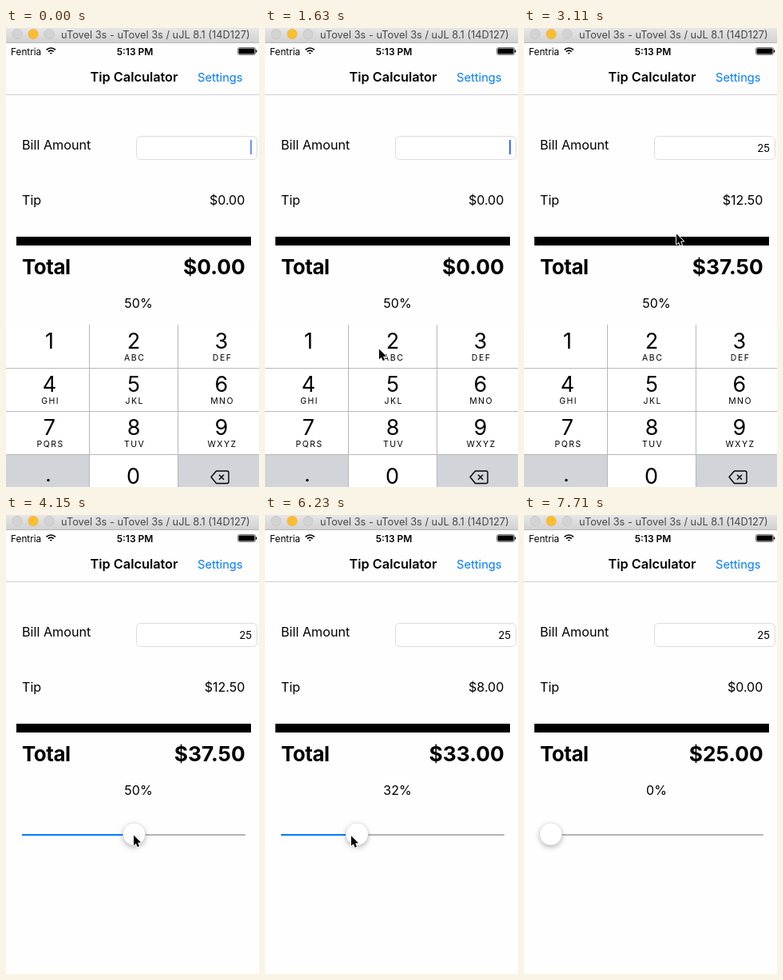
Recreate the animation shown at these times as an HTML page with a canvas. Size 317 px wide and 574 px high, loop 8 s.

```html
<!DOCTYPE html>
<html lang="en">
<head>
<meta charset="utf-8">
<title>Tip Calculator</title>
<style>
  html, body { margin: 0; width: 100%; height: 100%; overflow: hidden; background: #fefefe; }
  canvas { display: block; width: 317px; height: 574px; }
</style>
</head>
<body>
<canvas id="stage"></canvas>
<script>
const W = 317, H = 574, LOOP = 8000, STEP = 148.3;
const BLUE = '#007aff', KEY_GREY = '#d1d5da', LINE = '#b5b7ba';
const canvas = document.getElementById('stage');
const ctx = canvas.getContext('2d');
const dpr = window.devicePixelRatio || 1;
canvas.width = W * dpr;
canvas.height = H * dpr;

const clamp = v => Math.max(0, Math.min(1, v));
const linear = u => u;
const smooth = u => u * u * (3 - 2 * u);
const easeOut = u => u * (2 - u);
const money = v => '$' + v.toFixed(2);

// Each pointer move runs between two steps towards a position.
const ENTRY = { x: 196, y: 255 };
const MOVES = [
  { from: 3, to: 8, x: 62, y: 401, ease: easeOut },
  { from: 8, to: 11, x: 142, y: 401, ease: smooth },
  { from: 13, to: 15, x: 142, y: 441, ease: easeOut },
  { from: 18, to: 21, x: 190, y: 257, ease: smooth },
  { from: 23, to: 28, x: 159, y: 400, ease: smooth },
  { from: 35.4, to: 46, x: 75.5, y: 401, ease: linear },
  { from: 46, to: 51, x: -1, y: 411, ease: linear }
];

function pointerAt(k) {
  let { x, y } = ENTRY;
  for (const m of MOVES) {
    const u = m.ease(clamp((k - m.from) / (m.to - m.from)));
    x += (m.x - x) * u;
    y += (m.y - y) * u;
  }
  return { x, y };
}

// The thumb trails the dragging pointer slightly.
function sliderAt(k) {
  if (k < 35) return 0.5;
  return clamp(0.5 - 0.87 * (159 - pointerAt(k).x) / 254);
}

function caretAt(k) {
  if (k >= 12) return clamp((20 - k) / 2);
  return clamp(0.5 + 1.5 * Math.cos(2 * Math.PI * (k - 5.2) / 6.7));
}

function text(str, x, y, size, { weight = 400, color = '#000', align = 'left', spacing = 0 } = {}) {
  ctx.font = `${weight} ${size}px Inter, Roboto, sans-serif`;
  ctx.fillStyle = color;
  ctx.textAlign = align;
  ctx.letterSpacing = spacing + 'px';
  ctx.fillText(str, x, y);
}

function rect(x, y, w, h, color) {
  ctx.fillStyle = color;
  ctx.fillRect(x, y, w, h);
}

function paint(fill, stroke, width = 1) {
  if (fill) {
    ctx.fillStyle = fill;
    ctx.fill();
  }
  if (stroke) {
    ctx.strokeStyle = stroke;
    ctx.lineWidth = width;
    ctx.stroke();
  }
}

function circle(x, y, r, fill, stroke) {
  ctx.beginPath();
  ctx.arc(x, y, r, 0, Math.PI * 2);
  paint(fill, stroke, 0.8);
}

function roundRect(x, y, w, h, r, fill, stroke) {
  ctx.beginPath();
  ctx.roundRect(x, y, w, h, r);
  paint(fill, stroke);
}

function drawWindowBar() {
  const g = ctx.createLinearGradient(0, 0, 0, 18);
  g.addColorStop(0, '#e6e6e6');
  g.addColorStop(1, '#d2d2d2');
  rect(0, 0, W, 18, g);
  rect(0, 18, W, 1, '#b9b9b9');
  ['#d3d3d3', '#fdbd30', '#d3d3d3'].forEach((color, i) =>
    circle(14 + 20 * i, 7.5, 6, color, i === 1 ? '#efb02c' : '#c2c2c2'));
  text('uTovel 3s - uTovel 3s / uJL 8.1 (14D127)', 69, 12.5, 12.8, { color: '#484848' });
}

function drawStatusBar() {
  text('Fentria', 6, 33.5, 11.8);
  for (const r of [1.4, 4.8, 8]) {
    ctx.beginPath();
    ctx.arc(56.3, 33, r, -Math.PI * 0.75, -Math.PI * 0.25);
    paint(null, '#000', 1.7);
  }
  text('5:13 PM', 161.5, 33.5, 12, { weight: 600, align: 'center' });
  roundRect(290.5, 24.5, 22, 9, 2, null, '#777');
  roundRect(291.5, 25.5, 20, 7, 1, '#000');
  rect(313, 27.5, 1.3, 3, '#000');
}

function drawForm(bill, percent, caret) {
  const tip = bill * percent / 100;
  text('Tip Calculator', 160.5, 67, 16.3, { weight: 600, align: 'center' });
  text('Settings', 240, 66.5, 14.7, { color: BLUE });
  rect(0, 83, W, 1, '#cfcfcf');

  text('Bill Amount', 20, 151.5, 16.2);
  roundRect(163.5, 135.5, 151, 29, 5, '#fff', '#dcdcdc');
  if (bill) text(bill, 308, 155, 13.2, { align: 'right' });
  ctx.globalAlpha = caret;
  rect(306, 140, 2, 18, '#426bf2');
  ctx.globalAlpha = 1;

  text('Tip', 20, 220.5, 16.2);
  text(money(tip), 299.3, 220.5, 16, { align: 'right' });
  rect(13, 261, 294, 11, '#000');
  text('Total', 20, 307.5, 26, { weight: 700, spacing: -0.5 });
  text(money(bill + tip), 299.7, 307.5, 26.3, { weight: 700, align: 'right' });
  text(percent + '%', 166, 350, 16, { align: 'center' });
}

function drawSlider(value) {
  const x = 33.5 + value * 254;
  rect(20, 399, 280, 2, '#b4b4b4');
  rect(20, 399, x - 20, 2, BLUE);
  ctx.save();
  ctx.shadowColor = 'rgba(0,0,0,0.28)';
  ctx.shadowBlur = 6 * dpr;
  ctx.shadowOffsetY = 2.5 * dpr;
  circle(x, 399, 14, '#fff');
  ctx.restore();
  circle(x, 399, 14, '#fff', 'rgba(0,0,0,0.12)');
}

function drawDelete() {
  ctx.lineJoin = 'round';
  const icon = new Path2D('M257 561.5 L263.5 554 H277 Q279 554 279 556 V567.5 Q279 569.5 277 569.5 H263.5 Z' +
    'M267 558.7 l6 6 m0 -6 l-6 6');
  ctx.strokeStyle = '#000';
  ctx.lineWidth = 1.4;
  ctx.stroke(icon);
}

function drawKeypad(offset, pressed) {
  const letters = ['', 'ABC', 'DEF', 'GHI', 'JKL', 'MNO', 'PQRS', 'TUV', 'WXYZ'];
  ctx.save();
  ctx.translate(0, offset);
  rect(0, 371, W, 217, '#fff');
  rect(0, 534, 104, 54, KEY_GREY);
  rect(216, 534, 101, 54, KEY_GREY);
  letters.forEach((label, i) => {
    const col = i % 3, x = 54.5 + 107.7 * col - (col === 1 ? 2.2 : 0);
    const y = 371 + 54 * Math.floor(i / 3);
    if (i + 1 === pressed) rect(col * 105, y, 110, 54, '#cfd2da');
    text(i + 1, x, y + 30, 27, { align: 'center' });
    text(label, x + 1.2, y + 45.3, 10.5, { align: 'center', spacing: 1.5 });
  });
  text('0', 159.5, 570, 27, { align: 'center' });
  circle(53, 565.5, 1.7, '#000');
  drawDelete();
  for (const x of [104, 215]) rect(x, 371, 1, 217, LINE);
  for (let y = 425; y < 540; y += 54) rect(0, y, W, 1, LINE);
  ctx.restore();
}

function drawPointer({ x, y }) {
  const arrow = new Path2D('M0 0 V13.6 L3.1 10.8 L5.1 15.6 L7.5 14.6 L5.5 9.9 L9.7 9.7 Z');
  ctx.save();
  ctx.translate(x + 1, y + 0.6);
  ctx.scale(0.93, 0.93);
  ctx.lineJoin = 'round';
  ctx.lineWidth = 2;
  ctx.strokeStyle = '#fff';
  ctx.stroke(arrow);
  ctx.fillStyle = '#000';
  ctx.fill(arrow);
  ctx.restore();
}

function draw(time) {
  const k = Math.floor((time % LOOP + 20) / STEP);
  const bill = k < 13 ? 0 : k < 16 ? 2 : 25;
  const pressed = k === 12 ? 2 : k === 15 ? 5 : 0;
  const value = sliderAt(k);
  const slide = easeOut(clamp((k - 22.3) / 3.7));

  ctx.setTransform(dpr, 0, 0, dpr, 0, 0);
  rect(0, 0, W, H, '#fefefe');
  drawWindowBar();
  drawStatusBar();
  drawForm(bill, Math.round(value * 100), caretAt(k));
  drawSlider(value);
  if (slide < 1) drawKeypad(217 * slide, pressed);
  if (k >= 3 && k < 52) drawPointer(pointerAt(k));
}

const start = performance.now();
function tick() {
  draw(performance.now() - start);
  requestAnimationFrame(tick);
}
tick();
</script>
</body>
</html>
```
